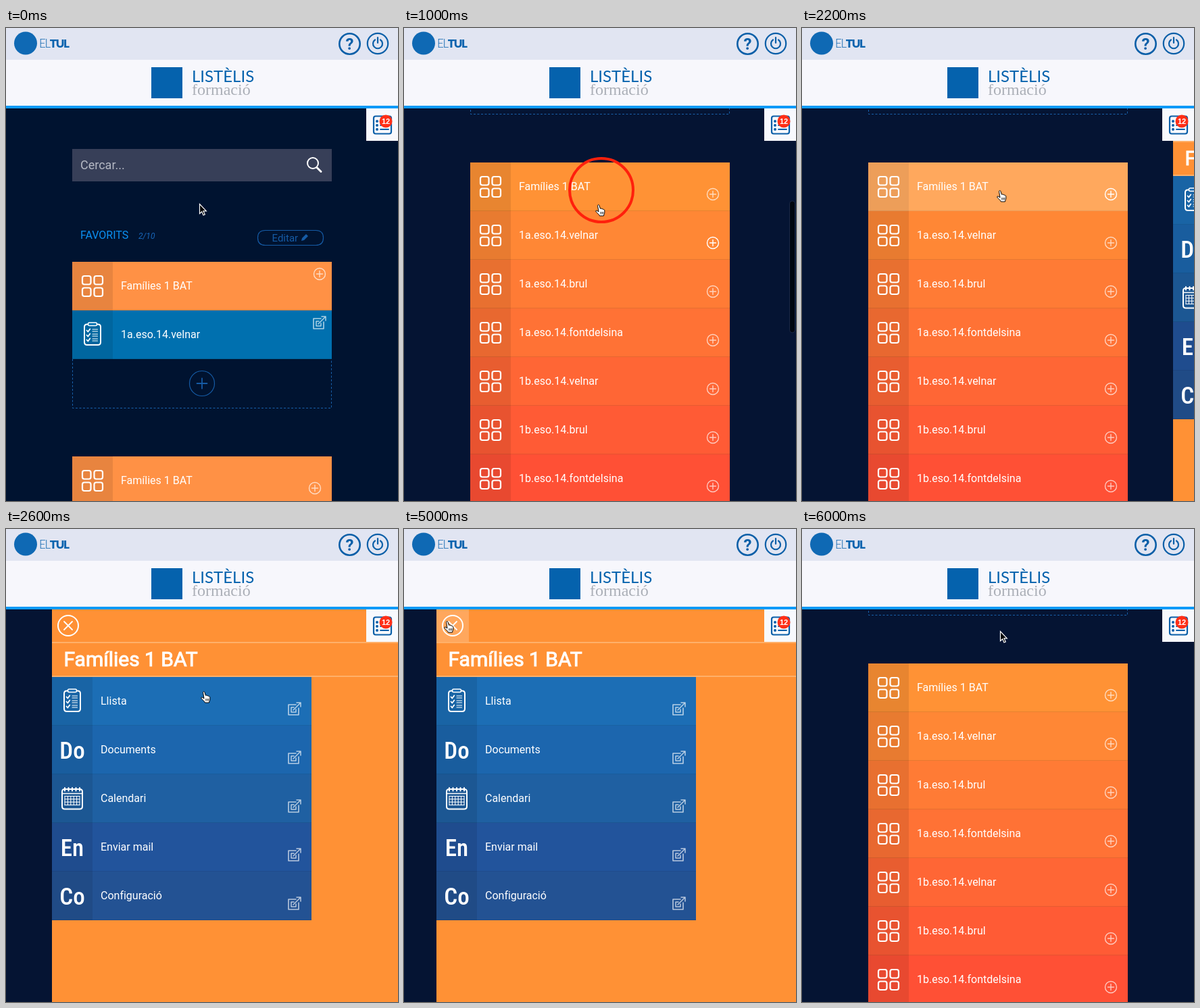
Write an HTML page that moves like this. It is 580 by 700 pixels and loops after 6.2 s.

```html
<!DOCTYPE html>
<html lang="ca">
<head>
<meta charset="utf-8">
<title>Tauler</title>
<style>
html, body { margin: 0; width: 100%; height: 100%; overflow: hidden; background: #051433; }
svg { display: block; width: 580px; height: 700px; font: 16px Roboto, sans-serif;
  font-variant-ligatures: none; --bg: #051433; --blue: #1c6eb5; --orange: #ff9235; }
svg.rest { --bg: #001330; --blue: #0070af; --orange: #ff9145; }
.line { fill: none; stroke: #fff; stroke-linecap: round; stroke-linejoin: round; }
.ink { stroke: #0a5fa8; }
.deep { stroke: #155ba5; }
.soft { opacity: .68; }
text { fill: #fff; white-space: pre; }
.big { font: 500 35px "Roboto Condensed", Roboto, sans-serif; font-stretch: 75%; text-anchor: middle; }
</style>
</head>
<body>
<svg id="stage" viewBox="0 0 580 700"></svg>
<script>
const stage = document.getElementById('stage');
const LOOP = 6200, STEP = 200;

const rect = (x, y, w, h, fill, more = '') =>
  `<rect x="${x}" y="${y}" width="${w}" height="${h}" fill="${fill}" ${more}/>`;
const line = (d, width = 2, cls = '') => `<path class="line ${cls}" stroke-width="${width}" d="${d}"/>`;
const ring = (x, y, r, width, cls = '') =>
  `<circle class="line ${cls}" cx="${x}" cy="${y}" r="${r}" stroke-width="${width}"/>`;
const text = (x, y, s, more = '') => `<text x="${x}" y="${y}" ${more}>${s}</text>`;
const group = (x, y, body, more = '') => `<g transform="translate(${x} ${y})" ${more}>${body}</g>`;
const box = (x, y, w, h, r) => `M${x + r} ${y}h${w - 2 * r}q${r} 0 ${r} ${r}v${h - 2 * r}q0 ${r} ${-r} ${r}` +
  `h${2 * r - w}q${-r} 0 ${-r} ${-r}v${2 * r - h}q0 ${-r} ${r} ${-r}z`;

// Icons for the 60 x 72 cell at the left of a row
const grid = line([15, 32.5].map(x => [21, 38.5].map(y => box(x, y, 12.5, 12.5, 3)).join('')).join(''), 2.2);
const clipboard = line(box(18, 20.5, 24, 30.5, 4), 2) +
  rect(24, 18, 12, 5, 'var(--blue)') + line(box(23.5, 18, 13, 4.5, 2), 1.6) +
  [29.5, 36.5, 43.5].map(y => line(`M21.500 ${y}l1.800 2 3-4`, 1.8) +
    line(`M30 ${y - 1.5}h7.500M30 ${y + 1.5}h7.500`, 1.2)).join('');
const calendar = line(box(15, 22, 30, 29.5, 4), 2) + line('M16 28.500h28', 1.4) +
  line([19, 24.5, 30, 35.5, 41].map(x => `M${x} 20v4.500`).join(''), 2) +
  line([32.5, 36.8, 41.1, 45.4].map(y => `M19 ${y}h22`).join('') +
    [19, 23.4, 27.8, 32.2, 36.6, 41].map(x => `M${x} 32.500v13`).join(''), 1);
const big = s => text(30, 49, s, 'class="big"');

// Icons at the right of a row, centred on 0,0
const plus = ring(0, 0, 8.5, 1.4) + line('M-4.5 0h9M0-4.5v9', 1.4);
const out = line('M2-6h-11v15h15v-10', 1.6) + line('M-1-2h-4v7h7v-4M-2 2L9-9M3-9h6v6', 1.5);

function row(x, y, fill, icon, label, mark, mx, my, id = '') {
  return group(x, y, rect(0, 0, 384, 72, fill) + rect(0, 0, 60, 72, '#000', 'opacity=".09"') +
    rect(0, 71, 384, 1, '#000', 'opacity=".1"') + icon + text(72, 41, label) +
    group(mx, my, mark, `class="soft" id="${id}"`));
}

const names = ['Famílies 1 BAT'];
for (const year of ['1a', '1b'])
  for (const place of ['velnar', 'brul', 'fontdelsina']) names.push(`${year}.eso.14.${place}`);
const warm = ['var(--orange)', '#ff8735', '#ff7b35', '#ff7235', '#ff6635', '#ff5b35', '#ff5035'];

const page =
  rect(98, 179, 384, 48, '#373f58') + text(110, 209, 'Cercar...', 'font-size="18" style="fill:#b4b8c3"') +
  ring(454, 200, 8, 2) + line('M460 206.500l6 6', 3) +
  text(110, 312, 'FAVORITS', 'style="fill:#0b8ff0"') +
  text(196, 312, '2/10', 'font-size="12" font-style="italic" style="fill:#1766b8"') +
  line(box(372.5, 299.5, 97, 22, 11), 1.2, 'deep') +
  text(393.5, 316, 'Editar', 'font-size="15" style="fill:#155ba5"') +
  '<path fill="#155ba5" d="M437 315l1-4 6-6 3 3-6 6z"/>' +
  row(98, 346, 'var(--orange)', grid, names[0], plus, 366, 18) +
  row(98, 418, 'var(--blue)', clipboard, names[1], out, 366, 18) +
  '<path fill="none" stroke="#1860aa" stroke-dasharray="3 2.5" d="M98.500 490v72.500h383v-72.500"/>' +
  ring(290, 526, 18.5, 1.2, 'deep') + line('M282.500 526h15M290 518.500v15', 1.8, 'deep') +
  names.map((s, i) => row(98, 634 + 72 * i, warm[i], grid, s, plus, 359, 47, 'plus' + i)).join('') +
  rect(98, 634, 384, 72, '#fff', 'id="hover" opacity=".2"');

const tools = [
  ['#1c6eb5', clipboard, 'Llista'], ['#1c66ae', big('Do'), 'Documents'],
  ['#1f60a2', calendar, 'Calendari'], ['#22549c', big('En'), 'Enviar mail'],
  ['#235293', big('Co'), 'Configuració']
];
// Panel is drawn with its left edge at 0
const panel =
  rect(0, 119, 540, 581, '#ff9135') + rect(0, 167, 540, 2, '#ffb069') + rect(0, 217, 540, 2, '#ffb069') +
  rect(0, 119, 48, 48, '#fff', 'id="closeHover" opacity=".2"') +
  ring(24, 143, 15, 2) + line('M18 137l12 12M30 137l-12 12', 1.8) +
  text(17.5, 203, names[0], 'font-size="30" stroke="#fff" stroke-width="1"') +
  tools.map(([fill, icon, label], i) =>
    row(0, 219 + 72 * i, fill, icon, label, out, 359, 47, 'tool' + i)).join('');

const side = rect(0, 119, 48, 581, '#00284a') + rect(0, 169, 48, 48, '#ff9135') +
  rect(47, 169, 1, 48, '#ffb069') + group(-6, 157, grid);

const header =
  rect(0, 0, 580, 47, '#e1e5f2') + rect(0, 47, 580, 68, '#f7f7fc') + rect(0, 115, 580, 4, '#0d9af8') +
  '<circle cx="29" cy="22.500" r="17" fill="#0f69b4"/>' +
  text(49, 29, 'EL<tspan font-weight="900">TUL</tspan>',
    'style="font:300 17px Lato,sans-serif;letter-spacing:-1.4px;fill:#0a63ae"') +
  rect(215, 58, 46, 46, '#0562ad') +
  text(275, 80, 'LISTÈLIS', 'style="font:24px Lato,sans-serif;fill:#0562ad"') +
  text(275, 99, 'formació', 'style="font:24px Liberation Serif,serif;fill:#abafb7"') +
  ring(508.5, 23.5, 15.2, 2.6, 'ink') +
  text(508.5, 31.5, '?', 'font-size="24" font-weight="700" text-anchor="middle" style="fill:#0a5fa8"') +
  ring(550, 23, 15.2, 2.2, 'ink') + line('M546 17.500a7 7 0 1 0 8 0M550 14v8', 2.2, 'ink');

const badge = rect(533, 119, 47, 48, '#f8f9fd') + line(box(544, 130.5, 26, 26, 3), 2.2, 'ink') +
  [138, 144, 150].map(y => `<circle cx="549" cy="${y}" r="2" fill="#0a5fa8"/>` +
    line(`M554 ${y}h12`, 1.8, 'ink')).join('') +
  '<circle cx="562" cy="138" r="9.500" fill="#ff2f17"/>' +
  text(562, 142, '12', 'style="font:700 11px Liberation Sans,sans-serif" text-anchor="middle"');

const arrow = '<path id="arrow" fill="#000" stroke="#fff" stroke-width="1.200" ' +
  'd="M.5.500v14.200l3.200-3 2.300 5.300 2.300-1-2.300-5.100h4.300z"/>';
const hand = '<g id="hand" stroke="#000"><path fill="#fff" d="M3.600 2.200C3.200.4 5.400 0 6 1.800L7.400 6.400' +
  'C8.400 5.600 9.600 6 9.800 7C10.800 6.400 11.800 6.800 12 7.800C13 7.400 13.800 8.200 13.800 9.200V12' +
  'C13.800 14 12.600 15 12.400 17H6.400C6 15 3 13 1.200 11C0 9.400 1.600 8.400 2.800 9.400L5 11Z"/>' +
  '<path d="M7.800 11v3.500M9.800 11v3.500M11.600 11v3.500" stroke-width=".8"/></g>';

stage.innerHTML = rect(0, 0, 580, 700, 'var(--bg)') +
  `<g id="page">${page}</g>` +
  rect(570.5, 0, 8, 195, '#000610', 'id="bar" rx="4" stroke="#1a2847"') +
  `<g id="side">${side}</g><g id="panel">${panel}</g>` + header + badge +
  '<circle id="mark" fill="none" stroke="#ff200c" stroke-width="4"/>' +
  `<g id="cursor">${arrow}${hand}</g>`;

const el = id => document.getElementById(id);
const set = (id, attrs) => { for (const k in attrs) el(id).setAttribute(k, attrs[k]); };
const show = (id, on) => { el(id).style.display = on ? '' : 'none'; };
const move = (id, x, y) => set(id, { transform: `translate(${x} ${y})` });
const bright = (id, on) => { el(id).style.opacity = on ? 1 : ''; };

// Linear interpolation through [time, value] pairs
function at(t, keys) {
  const i = keys.findIndex(k => k[0] > t);
  if (i < 0) return keys[keys.length - 1][1];
  if (!i) return keys[0][1];
  const [t0, a] = keys[i - 1], [t1, b] = keys[i];
  return a + (b - a) * (t - t0) / (t1 - t0);
}

const scrollKeys = [[200, 0], [400, 90], [600, 257], [800, 395], [1000, 435]];
const panelKeys = [[2000, 600], [2200, 549], [2400, 250], [2600, 68], [2800, 50], [3000, 48],
  [5000, 48], [5200, 90], [5400, 330], [5600, 555], [5800, 600]];
const sideKeys = [[2600, 0], [3000, 1], [4600, 1], [5000, 0]];
const cursorX = [[200, 286], [600, 283], [1200, 283], [1600, 288], [2600, 288], [3000, 280],
  [3800, 280], [4600, 59], [5600, 59], [5800, 171], [6000, 293]];
const cursorY = [[200, 260], [600, 261], [1200, 261], [1600, 240], [2600, 240], [3000, 238],
  [3800, 238], [4600, 136], [5600, 136], [5800, 146], [6000, 151]];

function draw(t) {
  const scroll = at(t, scrollKeys), px = at(t, panelKeys);
  stage.setAttribute('class', t < 400 ? 'rest' : '');
  move('page', 0, -scroll);
  move('panel', px, 0);
  set('side', { opacity: at(t, sideKeys) });
  set('bar', { y: 121.5 + scroll * .309 });
  show('bar', t >= 400 && t < 1600);

  show('hover', t >= 1600 && t < 3000);
  bright('plus0', t >= 1600 && t < 3000);
  bright('plus1', t >= 1000 && t < 1600);
  bright('tool0', t >= 3000 && t < 4200);
  show('closeHover', t >= 4600 && t < 5400);

  const first = t >= 1000 && t < 1800;
  show('mark', first || t >= 3600 && t < 4400);
  set('mark', first ? { cx: 292, cy: 240, r: 47 } : { cx: 63, cy: 137, r: 48 });

  const pointing = t >= 400 && t < 5400;
  show('hand', pointing);
  show('arrow', !pointing);
  move('cursor', at(t, cursorX), at(t, cursorY));
}

const start = performance.now();
function tick() {
  const t = (performance.now() - start) % LOOP;
  draw(Math.floor(t / STEP) * STEP);
  requestAnimationFrame(tick);
}
tick();
</script>
</body>
</html>
```
